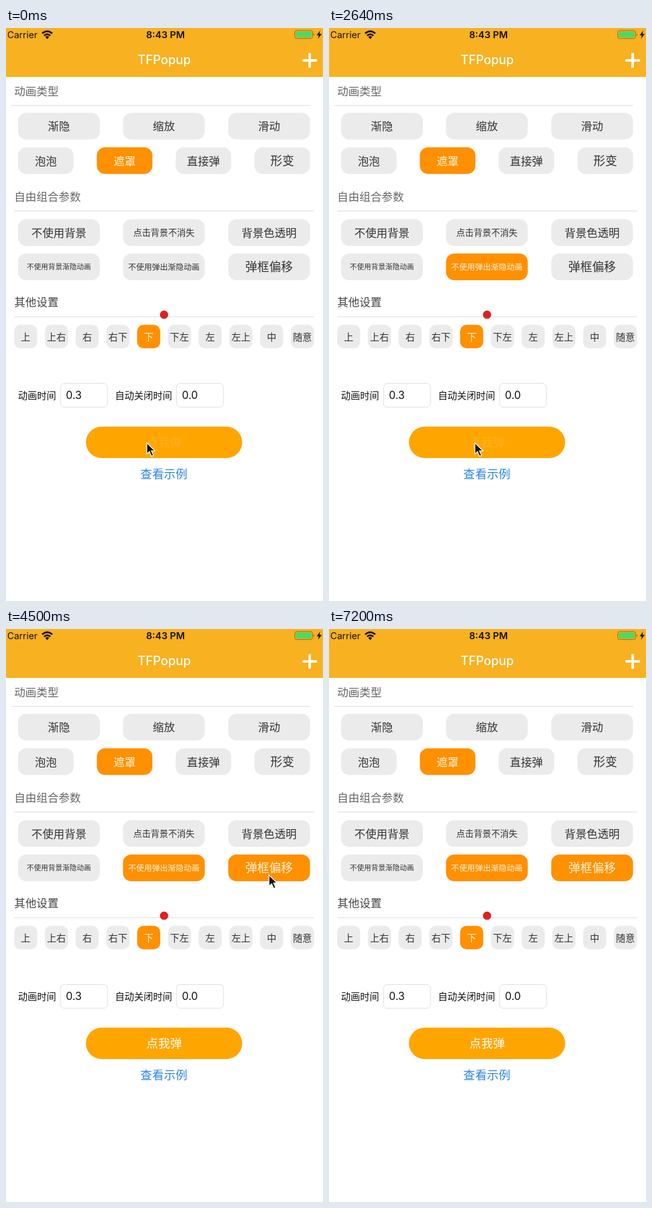
Recreate the animation shown at these times as an HTML page. Size 500 px wide and 902 px high, loop 7.38 s.

```html
<!DOCTYPE html>
<html lang="zh-CN">
<head>
<meta charset="utf-8">
<title>TFPopup</title>
<style>
html, body { margin: 0; height: 100%; overflow: hidden; background: #fff; }
svg { display: block; width: 100vw; height: 100vh; }
text { font-family: "Noto Sans CJK SC", "Noto Sans CJK", "Noto Sans CJK JP", sans-serif; }
.latin { font-family: Inter, Roboto, sans-serif; }
.chip rect { fill: #ebebeb; }
.chip text { fill: #333; }
.chip.on rect { fill: #ff9000; }
.chip.on text { fill: #fff4dc; }
</style>
</head>
<body>
<svg id="stage" viewBox="0 0 500 902"></svg>
<script>
const LOOP = 7380, STEP = 60, FADE = 300;
const BOX = { x: 56.5, y: 347, w: 386, h: 209 };
const MID = BOX.y + BOX.h / 2;
const stage = document.getElementById('stage');

// Text placed by the vertical middle of its ideographs
const label = (s, x, y, size, fill, anchor = 'middle', id = '') =>
  `<text id="${id}" x="${x}" y="${y + size * .37}" font-size="${size}" fill="${fill}" text-anchor="${anchor}">${s}</text>`;
const latin = (s, x, y, size, fill, weight = 400, anchor = 'start') =>
  `<text class="latin" x="${x}" y="${y + size * .36}" font-size="${size}" fill="${fill}" font-weight="${weight}" text-anchor="${anchor}">${s}</text>`;
const chip = (s, x, y, w, h, r, size, on = '', id = '') =>
  `<g class="chip ${on}" id="${id}"><rect x="${x}" y="${y}" width="${w}" height="${h}" rx="${r}"/>` +
  label(s, x + w / 2, y + h / 2 + .3, size, '') + '</g>';
const rule = (x1, x2, y) => `<path d="M${x1} ${y}H${x2}" stroke="#e6e6e6" stroke-width="1.4"/>`;
const field = (s, x) =>
  `<rect x="${x}" y="559.5" width="74" height="37.5" rx="6" fill="#fff" stroke="#dedede"/>` +
  latin(s, x + 8.5, 578, 16.8, '#111');

const COLS3 = [19, 184.5, 350.5], COLS4 = [19, 143.3, 267.6, 392];
const row = (items, cols, y, w) => items.map(([s, size, on, id], i) =>
  chip(s, cols[i], y, w, 42, 13, size, on, id)).join('');

const page = `
  <rect width="500" height="902" fill="#fff"/>
  <rect width="500" height="77" fill="#f8b120"/>
  ${latin('TFPopup', 249.5, 50, 19.4, '#fff', 500, 'middle')}
  <path d="M467.5 51H490.5M479 39.5V62.5" stroke="#fff" stroke-width="4"/>
  ${label('动画类型', 13, 99.5, 17.5, '#666', 'start')}
  ${rule(8, 480, 122)}
  ${row([['渐隐', 17.4], ['缩放', 17.4], ['滑动', 17.4]], COLS3, 133.5, 129)}
  ${row([['泡泡', 17.4], ['遮罩', 17.4, 'on'], ['直接弹', 17.4], ['形变', 18.8]], COLS4, 187.8, 87.6)}
  ${label('自由组合参数', 13, 266, 17.5, '#666', 'start')}
  ${rule(13, 486, 288)}
  ${row([['不使用背景', 17.4], ['点击背景不消失', 13.8], ['背景色透明', 17.4]], COLS3, 301, 129)}
  ${row([['不使用背景渐隐动画', 11.25], ['不使用弹出渐隐动画', 12.5, '', 'noFade'], ['弹框偏移', 18.8, '', 'offset']], COLS3, 355, 129)}
  ${label('其他设置', 13, 432, 17.5, '#444', 'start')}
  ${rule(13, 486, 454.5)}
  ${['上', '上右', '右', '右下', '下', '下左', '左', '左上', '中', '随意'].map((s, i) =>
    chip(s, 12.8 + i * 48.5, 467.3, 36.5, 37, 10, 15, i === 4 ? 'on' : '')).join('')}
  ${label('动画时间', 19, 578.5, 15, '#111', 'start')}
  ${field('0.3', 86)}
  ${label('自动关闭时间', 172, 578.5, 15, '#111', 'start')}
  ${field('0.0', 269)}
  <rect x="126" y="627.5" width="246.5" height="49.5" rx="24.75" fill="#ffa500"/>
  ${label('点我弹', 249.3, 652.3, 18.7, '#fff', 'middle', 'fire')}
  ${label('查看示例', 249, 702, 18.6, '#2b83e6')}`;

const popup = `
  <clipPath id="wedge"><path id="wedgePath"/></clipPath>
  <g id="popup"><g clip-path="url(#wedge)">
    <rect x="${BOX.x}" y="${BOX.y}" width="${BOX.w}" height="${BOX.h}" rx="6" fill="#fbf7c4"/>
    <path d="M${BOX.x} ${MID - 59.5}L125 ${MID}L${BOX.x} ${MID + 59.5}Z" fill="#e2e2e2"/>
    ${label('提示', 249, 387.5, 18.2, '#333')}
    ${label('这是一个普通的弹框,支持xib,可以不改变原有', 249, 438, 17.4, '#757068')}
    ${label('布局直接弹出来。', 249, 458.5, 17.4, '#757068')}
    ${label('确定', 249, 513.5, 18.2, '#ff9f1c')}
  </g></g>`;

const status = `
  ${latin('Carrier', 2, 11, 14.6, '#111')}
  <g fill="none" stroke="#111" stroke-width="2.6">
    <path d="M57 8.6Q65 1.6 73 8.6M60 12Q65 7.6 70 12"/>
  </g>
  <path d="M62 14Q65 11.4 68 14L65 17.4Z" fill="#111"/>
  ${latin('8:43 PM', 251.5, 11, 15, '#111', 600, 'middle')}
  <rect x="455.5" y="4" width="28" height="12.6" rx="3" fill="#f8b120" stroke="#a5651a"/>
  <rect x="457" y="5.5" width="25" height="9.6" rx="1.8" fill="#4cd964"/>
  <path d="M485 8Q487.6 10.3 485 12.6Z" fill="#a5651a"/>
  <path d="M495.5 4L490 11.5H493.5L492 17L498 9.2H494.4Z" fill="#111"/>`;

stage.innerHTML = page +
  '<rect id="dim" width="500" height="902"/>' + popup + status +
  '<circle cx="249.3" cy="451.3" r="6.5" fill="#e02020"/>' +
  '<path id="cursor" d="M0 0V17.5L4.2 13.8L7.4 21.2L10.6 19.8L7.4 12.6H12.8Z" fill="#111" stroke="#fff" stroke-width="1.3"/>';

const el = id => document.getElementById(id);
const clamp = v => Math.max(0, Math.min(1, v));
const ease = v => { v = clamp(v); return v * v * (3 - 2 * v); };

// Each showing: finger down, finger up (opens), closing start
const SHOWS = [
  { down: 0, open: 120, close: 906, fades: true, dy: 0 },
  { down: 2580, open: 2720, close: 3348, fades: false, dy: 0 },
  { down: 5130, open: 5260, close: 6135, fades: false, dy: -185 }
];
const MOVES = [
  [0, 222, 653], [1500, 222, 653], [1980, 262, 378], [2160, 262, 378],
  [2520, 230, 653], [3720, 230, 653], [4260, 420, 378], [4440, 420, 378],
  [4980, 268, 648], [6480, 268, 648], [6900, 310, 915], [LOOP, 310, 915]
];

function cursorAt(t) {
  const i = MOVES.findIndex(m => m[0] > t);
  const [t0, x0, y0] = MOVES[i - 1], [t1, x1, y1] = MOVES[i];
  const k = ease((t - t0) / (t1 - t0));
  return [x0 + (x1 - x0) * k, y0 + (y1 - y0) * k];
}

function draw(t) {
  const show = SHOWS.filter(s => s.down <= t).pop();
  const out = ease((t - show.close) / FADE);
  const dim = ease((t - show.open) / FADE) - out;
  const reveal = ease((t - show.open - 90) / FADE) - out;
  const tip = BOX.x + reveal * 640;

  el('dim').setAttribute('opacity', .3 * dim);
  el('wedgePath').setAttribute('d', `M${tip} ${MID}l-800 -700v1400Z`);
  el('popup').setAttribute('transform', `translate(0 ${show.dy})`);
  el('popup').setAttribute('opacity', show.fades ? reveal : 1);
  el('popup').setAttribute('visibility', reveal > 0 ? 'visible' : 'hidden');
  el('fire').setAttribute('opacity', .12 + .88 * ease((t - show.open) / FADE));
  el('noFade').classList.toggle('on', t >= 2100);
  el('offset').classList.toggle('on', t >= 4380);
  el('cursor').setAttribute('transform', `translate(${cursorAt(t)})`);
}

const start = performance.now();
function tick() {
  const t = (performance.now() - start) % LOOP;
  draw(Math.min(Math.floor(t / STEP) * STEP, 7200));
  requestAnimationFrame(tick);
}
tick();
</script>
</body>
</html>
```
